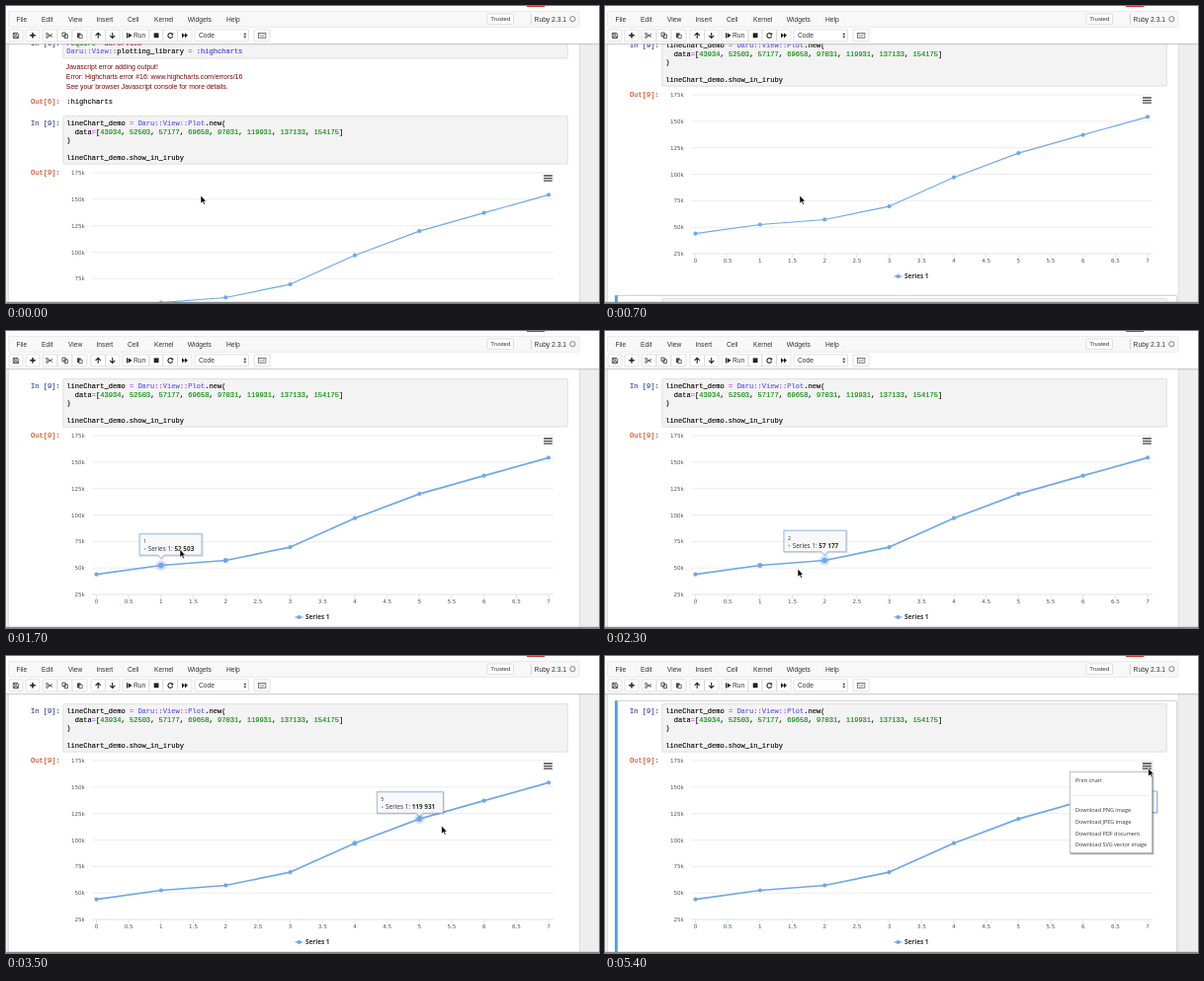
An HTML page for the animation above (5.5 s loop, 600 by 301 pixels).

```html
<!DOCTYPE html>
<html lang="en">
<head>
<meta charset="utf-8">
<title>Notebook line chart</title>
<style>
html, body { margin: 0; width: 100%; height: 100%; overflow: hidden; background: #fff; }
svg { display: block; width: 100vw; height: 100vh; }
text { white-space: pre; }
.ui { font-family: "Liberation Sans", Arial, sans-serif; font-size: 6.7px; fill: #333; }
.err { font-family: "Liberation Sans", Arial, sans-serif; font-size: 6.9px; fill: #800000; }
.code { font-family: "Liberation Mono", monospace; font-size: 7.07px; fill: #000; stroke: #000; stroke-width: .12px; }
.axis { font-family: "DejaVu Sans", sans-serif; font-size: 5.6px; fill: #555; }
.lab { font-family: "Open Sans", sans-serif; font-size: 6.4px; fill: #333; }
.head { font-size: 5.3px; }
.item { font-size: 5.5px; }
.b { font-weight: bold; }
</style>
</head>
<body>
<svg id="stage" viewBox="0 0 600 301" preserveAspectRatio="none" xmlns="http://www.w3.org/2000/svg"></svg>
<script>
const LOOP = 5500, STEP = 100;
const BLUE = '#6fa8e8';
const values = [43934, 52503, 57177, 69658, 97031, 119931, 137133, 154175];

// Page coordinates: the chart's axis runs from 175k at y 169 to 25k at y 330.
const px = i => 91.5 + i * 65.36;
const py = v => 169 + (175 - v / 1000) * 161 / 150;

const text = (x, y, s, cls = 'ui', more = '') =>
  `<text x="${x}" y="${y}" dy=".35em" class="${cls}" ${more}>${s}</text>`;
const rect = (x, y, w, h, fill, more = '') =>
  `<rect x="${x}" y="${y}" width="${w}" height="${h}" fill="${fill}" ${more}/>`;
const path = (d, more = '') => `<path d="${d}" ${more}/>`;
const dot = (x, y, r, fill, more = '') =>
  `<circle cx="${x}" cy="${y}" r="${r}" fill="${fill}" ${more}/>`;
const ink = (s, c) => `<tspan fill="${c}" stroke="${c}">${s}</tspan>`;
const tag = s => ink(s, '#5b55f0');
const sep = ink('::', '#a040ff');
const eq = ink('=', '#a2f');
const prompt = (y, s, c) => text(25, y, s, 'code', `style="fill:${c};stroke:${c}"`);
const NAVY = '#303f9f', RUST = '#d84315';

function cells() {
  const border = 'stroke="#cfcfcf" stroke-width=".6" rx="1"';
  const nums = values.map(v => ink(v, '#080')).join(', ');
  const line = i => 118.5 + i * 8.65;
  return rect(57.8, 20, 510.5, 33, '#f3f3f3', border) +
    prompt(37.3, 'In [6]:', NAVY) +
    text(61.3, 37.3, ink('require', '#008000') + ' ' + ink("'daru/view'", '#ba2121'), 'code') +
    text(61.3, 46, `${tag('Daru')}${sep}${tag('View')}${sep}plotting_library ${eq} ${ink(':highcharts', '#3a3ae0')}`, 'code') +
    text(60.8, 61.8, 'Javascript error adding output!', 'err') +
    text(60.8, 71.8, 'Error: Highcharts error #16: www.highcharts.com/errors/16', 'err') +
    text(60.8, 81.8, 'See your browser Javascript console for more details.', 'err') +
    prompt(97, 'Out[6]:', RUST) + text(61.3, 97, ':highcharts', 'code') +
    `<g id="sel9">${selection(108.3, 263)}</g><g id="sel10">${selection(372.3, 60)}</g>` +
    rect(57.8, 111.6, 510.5, 48.6, '#f3f3f3', border) +
    prompt(line(0), 'In [9]:', NAVY) +
    text(61.3, line(0), `lineChart_demo ${eq} ${tag('Daru')}${sep}${tag('View')}${sep}${tag('Plot')}.new(`, 'code') +
    text(61.3, line(1), `  data${eq}[${nums}]`, 'code') +
    text(61.3, line(2), ')', 'code') +
    text(61.3, line(4), 'lineChart_demo.show_in_iruby', 'code') +
    prompt(168.3, 'Out[9]:', RUST) +
    rect(57.8, 375.3, 510.5, 15, '#f3f3f3', border);
}

function selection(y, h) {
  return rect(10.3, y, 568.4, h, '#fff', 'stroke="#ababab" stroke-width=".6" rx="1"') +
    rect(10, y, 2.8, h, '#42a5f5');
}

function chart() {
  let s = '';
  for (let k = 175; k >= 25; k -= 25) {
    const y = py(k * 1000);
    s += path(`M87 ${y}H554`, `stroke="${k === 25 ? '#ccd6eb' : '#e6e6e6'}" stroke-width=".7"`) +
      text(79.8, y + .2, k + 'k', 'axis', 'text-anchor="end"');
  }
  for (let i = 0; i <= 7; i += .5) {
    s += path(`M${px(i)} 330v4.5`, 'stroke="#ccd6eb" stroke-width=".6"') +
      text(px(i), 336.9, i, 'axis', 'text-anchor="middle"');
  }
  const d = 'M' + values.map((v, i) => `${px(i)} ${py(v)}`).join('L');
  s += path(d, `id="line" fill="none" stroke="${BLUE}" stroke-linejoin="round" stroke-linecap="round"`);
  s += dot(0, 0, 5.2, BLUE, 'id="halo" opacity=".3"');
  values.forEach((v, i) => { s += dot(px(i), py(v), 2.1, BLUE, 'class="mark"'); });
  s += path('M292.5 353h8', `stroke="${BLUE}" stroke-width="1.2"`) + dot(296.5, 353, 2.1, BLUE) +
    text(303, 353, 'Series 1', 'lab b');
  s += rect(542.5, 169.3, 12.5, 11, '#e6ebf5', 'id="hot" rx="1"') +
    path('M544 172h8.8M544 174.6h8.8M544 177.2h8.8', 'stroke="#444" stroke-width="1.3"');
  return s;
}

function tooltip() {
  return `<g id="tip"><path id="tipShade" fill="none" stroke="#000" stroke-opacity=".12" stroke-width="2" transform="translate(.6 .6)"/>
    <path id="tipBox" fill="#f7f7f7" fill-opacity=".88" stroke="${BLUE}" stroke-width=".7"/>
    <g id="tipText">${text(4, 7.6, '', 'lab head', 'id="tipKey"')}${dot(5.4, 15.3, .9, BLUE)}
    <text x="8.7" y="15.2" dy=".35em" class="lab">Series 1: <tspan id="tipVal" class="b"></tspan></text></g></g>`;
}

function menu() {
  const kinds = ['PNG image', 'JPEG image', 'PDF document', 'SVG vector image'];
  return `<g id="menu">` +
    rect(471.5, 182, 84, 82.5, '#000', 'opacity=".18"') + rect(471, 181, 83.8, 82.8, '#000', 'opacity=".22"') +
    rect(470.3, 180.3, 83.4, 82.4, '#fff', 'stroke="#999" stroke-width=".6"') +
    text(476, 189, 'Print chart', 'lab item') +
    path('M473 204.3H551', 'stroke="#d8d8d8" stroke-width=".5"') +
    kinds.map((k, i) => text(476, 219.2 + i * 11.75, 'Download ' + k, 'lab item')).join('') + '</g>';
}

function header() {
  const btn = (x, w) => rect(x, 23.8, w, 12, '#fff', 'stroke="#ccc" stroke-width=".6" rx="1"');
  const menus = [['File', 10.5], ['Edit', 36], ['View', 63], ['Insert', 91.5], ['Cell', 123],
    ['Kernel', 150], ['Widgets', 183.8], ['Help', 223]];
  const line = 'fill="none" stroke="#333" stroke-width=".8"';
  const arrow = 'fill="none" stroke="#222" stroke-width="1.1"';
  return rect(0, 0, 600, 38, '#fff') +
    rect(527, -16, 18, 17, '#d9342b') +
    rect(2.5, 5.3, 577.5, 16, '#f8f8f8', 'stroke="#e2e2e2" stroke-width=".7" rx="1"') +
    menus.map(([s, x]) => text(x, 13.2, s)).join('') +
    rect(487, 8, 26.5, 10.4, '#fff', 'stroke="#ccc" stroke-width=".6" rx="1"') +
    text(500.2, 13.3, 'Trusted', 'ui', 'text-anchor="middle" style="font-size:6px"') +
    path('M531.3 8V19', 'stroke="#bbb" stroke-width=".6"') +
    text(534.6, 13.2, 'Ruby 2.3.1') + dot(573.3, 13.2, 2.6, 'none', 'stroke="#555" stroke-width=".7"') +
    btn(3, 14) + btn(20, 14) + btn(37, 15) + btn(52, 15) + btn(67, 15) + btn(86, 14.5) + btn(100.5, 14.5) +
    btn(118, 27) + btn(145, 14) + btn(159, 14.5) + btn(173.5, 14.5) + btn(191, 54.5) + btn(251, 16) +
    path('M7.3 27.3h4.2l1.2 1.2v4h-5.4zM8.5 27.3v1.8h2.5v-1.8M8.6 32.4v-1.7h2.8v1.7', line) +
    path('M27 27v5.6M24.2 29.8h5.6', 'stroke="#222" stroke-width="1.5"') +
    path('M42 28.6l5 2.8M42 31.2l5-2.8', line) + dot(41.5, 28.2, 1, 'none', 'stroke="#333" stroke-width=".7"') +
    dot(41.5, 31.6, 1, 'none', 'stroke="#333" stroke-width=".7"') +
    path('M57 27h3.2v3.8h-3.2zM59.2 28.8h3.2v3.8h-3.2z', line) +
    path('M72 27.4h3.6v4.8h-3.6z', 'fill="#444"') + path('M74 29.2h3.2v3.5h-3.2z', 'fill="#fff" stroke="#333" stroke-width=".7"') +
    path('M93.2 32.8v-5M90.6 29.9l2.6-2.6 2.6 2.6M107.7 27v5M105.1 29.9l2.6 2.6 2.6-2.6', arrow) +
    path('M122 27.2h1v5.2h-1zM123.6 27.2l4 2.6-4 2.6z', 'fill="#222"') + text(129, 29.9, 'Run') +
    rect(149.7, 27.4, 4.8, 4.8, '#222') +
    path('M168.2 28.4a2.4 2.4 0 1 0 .4 2.2', arrow) + path('M169.2 27v2.6h-2.6z', 'fill="#222"') +
    path('M178 27.2l3 2.6-3 2.6zM181 27.2l3 2.6-3 2.6z', 'fill="#222"') +
    text(195, 29.9, 'Code') +
    path('M240.3 29.2l1.5-2.2 1.5 2.2zM240.3 30.6l1.5 2.2 1.5-2.2z', 'fill="#444"') +
    rect(255.3, 27.6, 7.6, 4.6, 'none', 'stroke="#444" stroke-width=".7"') +
    path('M256.4 29.2h5.4M257.4 30.8h3.4', 'stroke="#444" stroke-width=".7" stroke-dasharray=".8 .4"') +
    path('M0 38.3H600', 'stroke="#c4c4c4" stroke-width=".8"') +
    path('M0 39.2H600', 'stroke="#000" stroke-opacity=".07"');
}

const stage = document.getElementById('stage');
stage.innerHTML = rect(0, 0, 600, 301, '#eee') +
  rect(2, 38, 578.6, 263, '#d9d9d9') + rect(2.8, 38, 577, 263, '#fff') +
  `<g id="page">${cells()}${chart()}${tooltip()}${menu()}</g>` + header() +
  rect(0, 299.8, 600, 1.2, '#8a8a8a') +
  path('M0 0V8.2L1.9 6.5L3.2 9.3L4.5 8.7L3.2 6H5.6Z', 'id="cursor" fill="#000" stroke="#fff" stroke-width=".6"');

const el = {};
stage.querySelectorAll('[id]').forEach(n => { el[n.id] = n; });
const marks = [...stage.querySelectorAll('.mark')];
const show = (n, on) => n.setAttribute('display', on ? 'inline' : 'none');

// Keys are [time, ...numbers], joined by straight lines.
const scrollKeys = [[0, 0], [100, 8], [200, 24], [300, 43], [400, 59], [500, 70], [600, 77], [700, 79],
  [800, 78], [1000, 67], [1100, 63.5], [1200, 63.5], [1300, 63]];
const mouseKeys = [[0, 197, 192], [1300, 197, 192], [1600, 178, 214], [1900, 172, 236], [2300, 195, 241],
  [2500, 208, 214], [2700, 262, 140], [2900, 345, 82], [3000, 364, 70], [3200, 380, 120], [3500, 440.7, 172],
  [3700, 446, 174], [3900, 490, 158], [4200, 546, 122], [4600, 548.5, 116.5], [4900, 549.7, 113.7]];
const hovers = [[1400, 2], [1550, 1], [2150, 2], [2650, 3], [2850, 4], [3350, 5], [3850, 6], [4150, 7]];
const CLICK = 5000;

function at(keys, t) {
  let i = keys.length - 1;
  while (i && keys[i][0] > t) i--;
  const a = keys[i], b = keys[i + 1] || a;
  const p = a === b ? 0 : (t - a[0]) / (b[0] - a[0]);
  return a.slice(1).map((v, j) => v + (b[j + 1] - v) * p);
}

const tipWidth = i => values[i] > 99999 ? 67 : 63;

function tipGoal(i) {
  const w = tipWidth(i), y = py(values[i]);
  return { x: Math.min(px(i) - w / 2, 558.5 - w), y: i === 7 ? y + 8.7 : y - 31 };
}

function tipState(t) {
  let pos = null, now = null, prev = null;
  hovers.forEach(([start, i], k) => {
    if (start > t) return;
    const goal = tipGoal(i);
    const end = k + 1 < hovers.length ? Math.min(t, hovers[k + 1][0]) : t;
    const p = 1 - Math.exp(-.0127 * (end - start));
    pos = pos ? { x: pos.x + (goal.x - pos.x) * p, y: pos.y + (goal.y - pos.y) * p } : goal;
    prev = now;
    now = { i, age: t - start };
  });
  return now && { ...pos, ...now, prev };
}

function tipOutline(s) {
  const { x, y, i } = s, w = tipWidth(i), r = x + w, b = y + 21.5;
  const c = Math.max(x + 5, Math.min(r - 5, px(i)));
  return i === 7 && y + 11 > py(values[i])
    ? `M${x} ${y}H${c - 3.2}L${c} ${y - 3.2}L${c + 3.2} ${y}H${r}V${b}H${x}Z`
    : `M${x} ${y}H${r}V${b}H${c + 3.2}L${c} ${b + 3.2}L${c - 3.2} ${b}H${x}Z`;
}

function draw(t) {
  el.page.setAttribute('transform', `translate(0 ${-at(scrollKeys, t)[0]})`);
  const [mx, my] = at(mouseKeys, t);
  el.cursor.setAttribute('transform', `translate(${mx} ${my})`);

  const s = tipState(t);
  show(el.tip, s);
  show(el.halo, s);
  el.line.setAttribute('stroke-width', s ? 1.65 : 1.15);
  marks.forEach((m, i) => {
    const fading = s && s.prev && s.prev.i === i && s.age < 250;
    m.setAttribute('r', s && s.i === i ? 2.8 : fading ? 2.5 : 2.1);
  });
  if (s) {
    const d = tipOutline(s);
    el.halo.setAttribute('cx', px(s.i));
    el.halo.setAttribute('cy', py(values[s.i]));
    el.tipBox.setAttribute('d', d);
    el.tipShade.setAttribute('d', d);
    el.tipText.setAttribute('transform', `translate(${s.x} ${s.y})`);
    el.tipKey.textContent = s.i;
    el.tipVal.textContent = String(values[s.i]).replace(/(\d{3})$/, ' $1');
  }

  const open = t >= CLICK;
  show(el.sel9, open);
  show(el.sel10, !open);
  show(el.hot, t >= CLICK - 100);
  show(el.menu, open);
}

function frame(now) {
  draw(Math.floor(now % LOOP / STEP) * STEP);
  requestAnimationFrame(frame);
}
draw(0);
requestAnimationFrame(frame);
</script>
</body>
</html>
```
